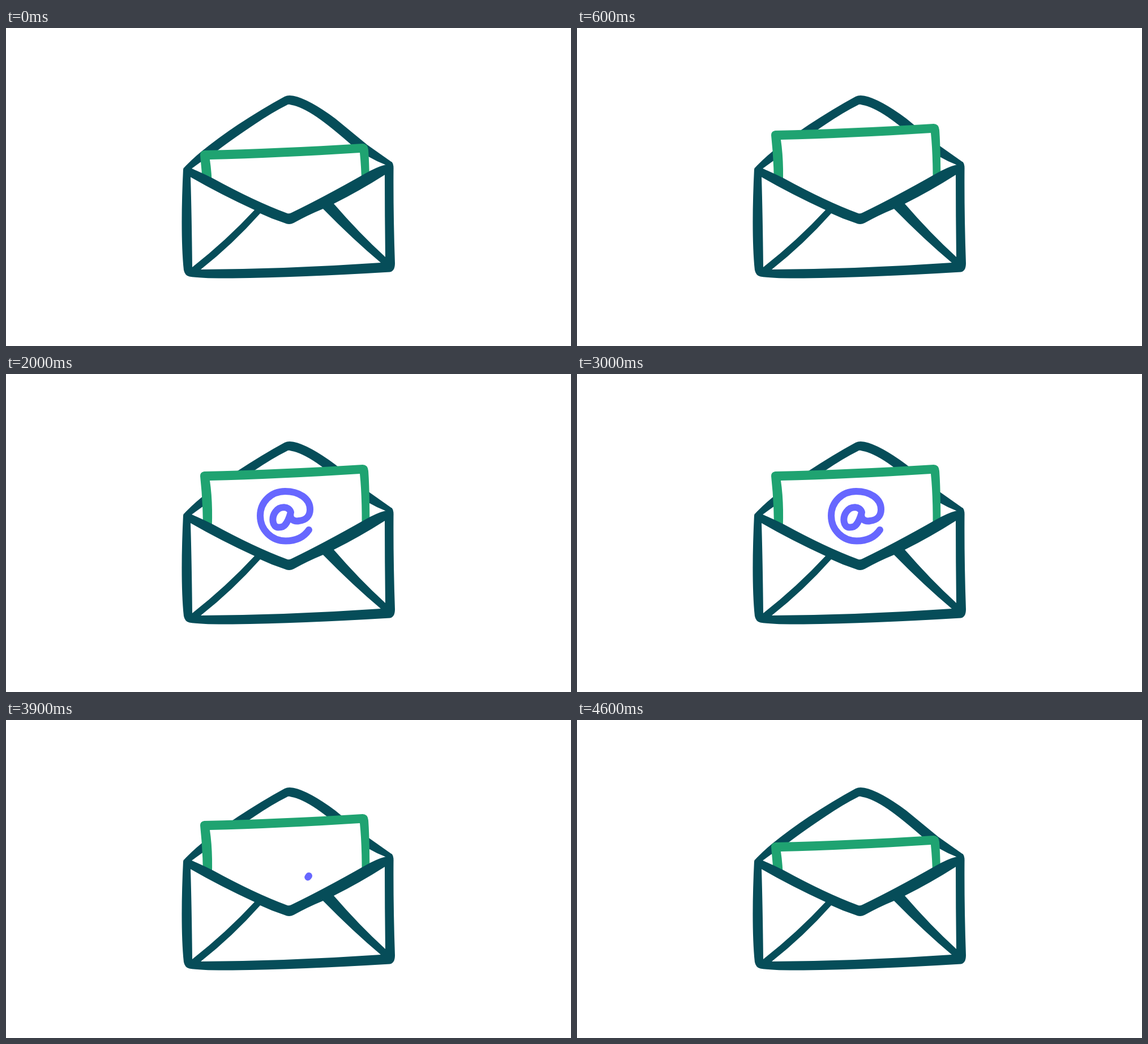
An HTML page without scripts that plays this animation: 998 by 561 pixels, repeating every 5010 ms.

```html
<!DOCTYPE html>
<html lang="en">
<head>
<meta charset="utf-8">
<title>Envelope</title>
<style>
  html, body { margin: 0; width: 100%; height: 100%; overflow: hidden; background: #fff; }
  svg { display: block; width: 100%; height: 100%; }
  .ink { fill: #064d59; }
  .green { fill: #1fa371; }
  .white { fill: #fff; }

  .paper { animation: slide 5010ms infinite; }
  .at {
    fill: none;
    stroke: #6767ff;
    stroke-width: 12;
    stroke-linecap: round;
    stroke-linejoin: round;
    stroke-dasharray: 1 2;
    animation: trim 5010ms infinite, show 5010ms step-end infinite;
  }

  @keyframes slide {
    0% { transform: translateY(44px); animation-timing-function: cubic-bezier(.75, 0, .25, 1); }
    19.96%, 70.86% { transform: none; animation-timing-function: cubic-bezier(.75, 0, .25, 1); }
    90.82%, 100% { transform: translateY(44px); }
  }
  @keyframes trim {
    0%, 19.96% { stroke-dashoffset: 1; animation-timing-function: cubic-bezier(.3, 0, .3, 1); }
    39.92%, 59.88% { stroke-dashoffset: 0; animation-timing-function: cubic-bezier(.3, 0, .3, 1); }
    79.84%, 100% { stroke-dashoffset: -1; }
  }
  @keyframes show {
    0%, 79.8%, 100% { opacity: 0; }
    20.1% { opacity: 1; }
  }
</style>
</head>
<body>
<svg viewBox="0 0 998 561">
  <!-- open flap -->
  <path class="ink" d="M313 248Q329 231 345 218Q376 193 409 171Q455 141 492 121Q498 118 506 119.500Q533 124 582 160L638 206L682 237L672 246L500 340Z"/>
  <path class="white" d="M328 248Q344 236 375 215Q400 196 439 170Q470 149 496 136Q499 134 503 135.500Q524 139 556 162Q578 178 610 206Q640 230 672 242L500 335Z"/>

  <g class="paper">
    <path class="green" d="M343 180Q343 173 350 172Q480 169 630 160Q639 160 640 171Q643 215 642 300H348Q349 235 343 180Z"/>
    <path class="white" d="M360 188Q480 185 625 176Q630 225 628 300H362Q367 235 360 188Z"/>
  </g>

  <!-- front pocket -->
  <path class="ink" d="M313 249L319 242L328 248Q345 255 365 265Q440 306 497 327Q500 328 504 326Q560 299 634 257Q655 245 671 241L681 236Q685 239 684.500 250Q684 330 687 415Q687 429 678 430.500Q520 440 400 441.500Q345 442 324 438.500Q316 437 314 427C309 380 310 310 313 249Z"/>
  <g class="white">
    <path d="M326 263Q378 293 439 321Q390 374 329 422Q328 330 326 263Z"/>
    <path d="M449 327Q470 337 492 344Q500 348 508 344Q533 330 560 319Q613 373 662 414Q500 425 344 426Q400 382 449 327Z"/>
    <path d="M579 310Q625 287 669 259Q669 330 670 404Q624 362 579 310Z"/>
  </g>

  <path class="at" pathLength="1" d="M503 244C500 233 484 232 476 243C468 254 471 270.500 481 270.500C487 270.500 491 269 493 266C499 259 501 251 503 244C500 255 507 261 518 259C530 258 537 250 537 239C537 219 517 207 493 207C468 207 449 226 449 250C449 275 469 294.500 494 294.500C512 294.500 526 288 535 275"/>
</svg>
</body>
</html>
```
